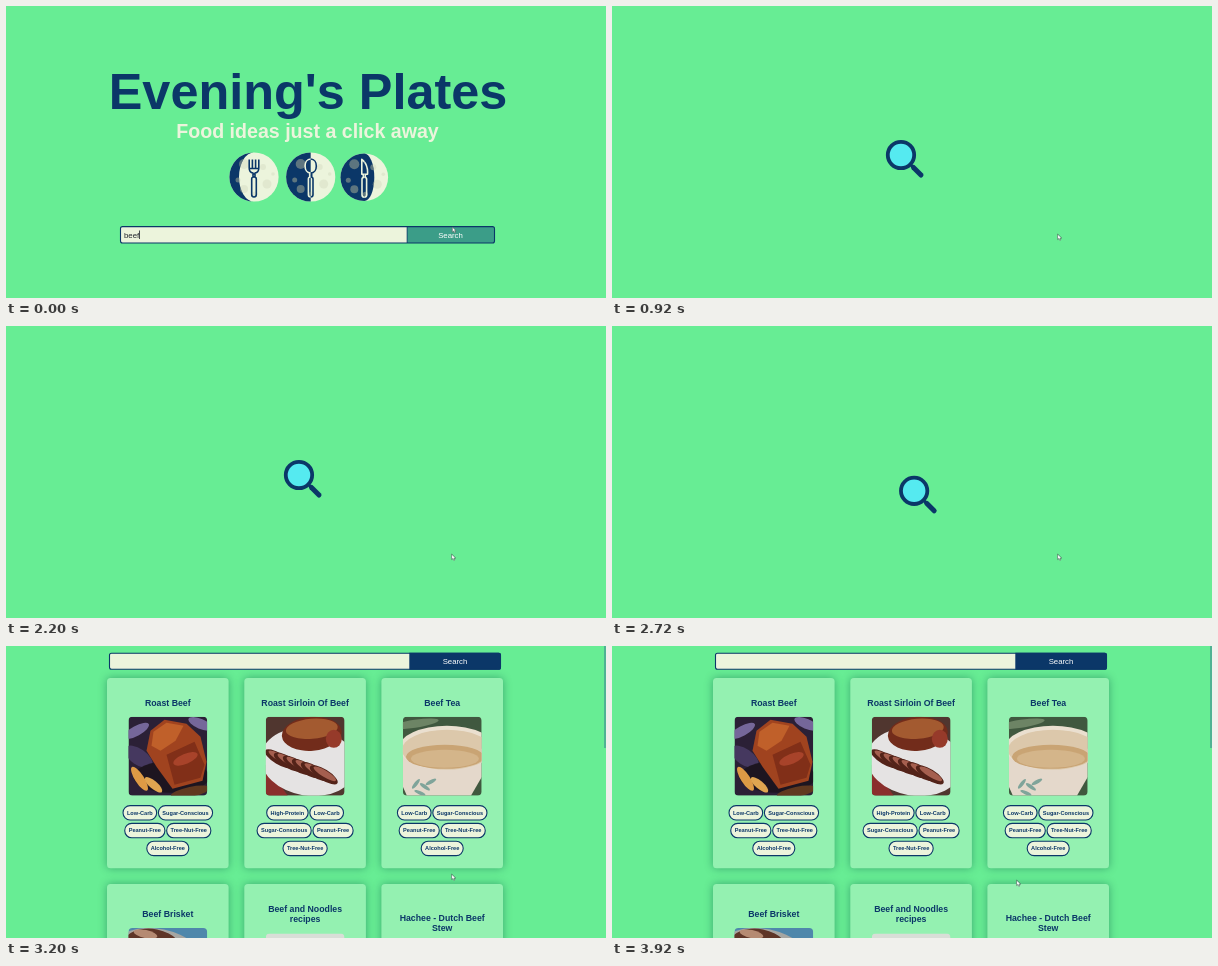
An HTML page with a canvas for the animation above (4 s loop, 600 px wide and 292 px high).

```html
<!DOCTYPE html>
<html lang="en">
<head>
<meta charset="utf-8">
<title>Recipe search</title>
<style>
html, body { margin: 0; width: 100%; height: 100%; overflow: hidden; background: #67ed94; }
canvas { display: block; width: 600px; height: 292px; }
</style>
</head>
<body>
<canvas id="stage"></canvas>
<script>
const canvas = document.getElementById('stage');
const ctx = canvas.getContext('2d');
const ratio = window.devicePixelRatio || 1;
canvas.width = 600 * ratio;
canvas.height = 292 * ratio;

const GREEN = '#67ed94', NAVY = '#0b3768', CREAM = '#ecf4dc', CARD = '#94f1b1';
const LOOP = 4000, LOADING = 833, RESULTS = 2800, PHOTOS = 3200;
const LENS_PERIOD = 1222;

const mix = (a, b, k) => a + (b - a) * k;
const clamp = k => Math.max(0, Math.min(1, k));
const smooth = k => k * k * (3 - 2 * k);

function text(str, x, y, size, color, bold = true, align = 'center') {
  ctx.font = `${bold ? 'bold ' : ''}${size}px "Liberation Sans", Arial, sans-serif`;
  ctx.textAlign = align;
  ctx.fillStyle = color;
  ctx.fillText(str, x, y);
}

function box(x, y, w, h, r, fill, stroke, line = 1) {
  ctx.beginPath();
  ctx.roundRect(x, y, w, h, r);
  if (fill) { ctx.fillStyle = fill; ctx.fill(); }
  if (stroke) { ctx.strokeStyle = stroke; ctx.lineWidth = line; ctx.stroke(); }
}

function oval(x, y, rx, ry, fill, turn = 0) {
  ctx.beginPath();
  ctx.ellipse(x, y, rx, ry, turn, 0, Math.PI * 2);
  ctx.fillStyle = fill;
  ctx.fill();
}

function shape(fill, ...points) {
  ctx.beginPath();
  points.forEach(([x, y]) => ctx.lineTo(x, y));
  ctx.closePath();
  ctx.fillStyle = fill;
  ctx.fill();
}

function backdrop(fill) {
  ctx.fillStyle = fill;
  ctx.fillRect(0, 0, 79, 79);
}

function scoped(draw) {
  ctx.save();
  draw();
  ctx.restore();
}

function pointer(x, y) {
  scoped(() => {
    ctx.translate(x, y);
    const outline = new Path2D('M0 0V5.2L1.3 4.1L2.2 6L3.2 5.5L2.3 3.7H3.8Z');
    ctx.fillStyle = '#fff';
    ctx.fill(outline);
    ctx.strokeStyle = '#4b5a58';
    ctx.lineWidth = 0.6;
    ctx.stroke(outline);
  });
}

// Icon paths are centred on the moon they sit on.
const HANDLE = 'M-1 0V-3H1V0M-2.3 2Q-2.3 0 0 0Q2.3 0 2.3 2V17.5Q2.3 20 0 20Q-2.3 20 -2.3 17.5Z';
const FORK = new Path2D('M-4.8 -17.5V-9Q-4.8 -4.5 -1 -4V0M1 0V-4Q4.8 -4.5 4.8 -9V-17.5M-1.6 -17.5V-9M1.6 -17.5V-9M-4.8 -8.5H4.8' + HANDLE);
const SPOON = new Path2D('M0 -18C7.5 -18 7.5 -4 0 -4C-7.5 -4 -7.5 -18 0 -18Z' + HANDLE);
const KNIFE = new Path2D('M-2.5 -18Q4 -13 3.2 -3H-2.5Z' + HANDLE);
const CRATERS = [[-10, -13, 5], [-16, 3, 2.5], [-10, 12, 4], [9, -10, 3], [13, 7, 4.5], [1, 17, 2.5], [19, -3, 1.8]];

function craters(fill) {
  CRATERS.forEach(([x, y, r]) => oval(x, y, r, r, fill));
}

function moon(x, y, r, edge, icon, leftInk, rightInk) {
  scoped(() => {
    ctx.translate(x, y);
    oval(0, 0, r, r, CREAM);
    craters('rgba(165,175,140,.16)');
    scoped(() => {
      ctx.beginPath();
      ctx.arc(0, 0, r, Math.PI / 2, Math.PI * 1.5);
      ctx.ellipse(0, 0, Math.abs(edge), r, 0, -Math.PI / 2, Math.PI / 2, edge < 0);
      ctx.fillStyle = NAVY;
      ctx.fill();
      ctx.clip();
      craters('rgba(175,180,150,.5)');
    });
    ctx.lineWidth = 1.6;
    ctx.lineJoin = 'round';
    [[-r, leftInk], [0, rightInk]].forEach(([left, ink]) => scoped(() => {
      ctx.beginPath();
      ctx.rect(left, -r, r, r * 2);
      ctx.clip();
      ctx.strokeStyle = ink;
      ctx.stroke(icon);
    }));
  });
}

function home() {
  text("Evening's Plates", 302, 102.5, 50.4, NAVY);
  text('Food ideas just a click away', 301.5, 132, 19.6, CREAM);
  moon(248, 171, 24.6, -15, FORK, NAVY, NAVY);
  moon(304.7, 171, 24.6, 0.01, SPOON, CREAM, NAVY);
  moon(358.3, 171.3, 23.8, 10, KNIFE, CREAM, CREAM);
  box(114.5, 220.6, 374, 16.4, 2, CREAM);
  box(401, 220.6, 87.5, 16.4, [0, 2, 2, 0], '#3b9d88');
  box(114.5, 220.6, 374, 16.4, 2, null, NAVY, 1.1);
  ctx.fillStyle = NAVY;
  ctx.fillRect(400.7, 221, 0.8, 16);
  text('beef', 118, 231.5, 7.8, '#20242c', false, 'left');
  ctx.fillRect(133, 224.5, 0.8, 8.5);
  text('Search', 444.5, 231.7, 7.8, '#fff', false);
}

// The lens travels round a triangle at an even pace along each side.
function lens(t) {
  const phase = ((t - LOADING) / LENS_PERIOD % 1) * 3;
  const corners = [[283, 149], [311, 149], [297, 174], [283, 149]];
  const side = Math.floor(phase);
  const [from, to] = [corners[side], corners[side + 1]];
  const x = mix(from[0], to[0], phase - side);
  const y = mix(from[1], to[1], phase - side);
  ctx.strokeStyle = NAVY;
  ctx.lineCap = 'round';
  ctx.lineWidth = 3;
  ctx.beginPath();
  ctx.moveTo(x + 9, y + 9);
  ctx.lineTo(x + 14, y + 14);
  ctx.stroke();
  ctx.lineWidth = 5;
  ctx.beginPath();
  ctx.moveTo(x + 12.5, y + 12.5);
  ctx.lineTo(x + 20, y + 20);
  ctx.stroke();
  oval(x, y, 13.2, 13.2, '#55eaf0');
  ctx.lineWidth = 3.8;
  ctx.stroke();
}

function roast() {
  backdrop('#2b2036');
  oval(8, 14, 14, 5, '#75679a', -0.5);
  oval(72, 7, 13, 5, '#75679a', 0.4);
  oval(10, 40, 16, 8, '#45385f', 0.6);
  oval(43, 60, 38, 16, '#1d1520');
  shape('#a0431f', [22, 14], [36, 3], [58, 7], [72, 20], [78, 45], [74, 64], [44, 72], [28, 50], [18, 34]);
  shape('#c0602a', [25, 15], [38, 6], [55, 9], [47, 24], [32, 34], [23, 29]);
  shape('#812f18', [38, 38], [66, 25], [76, 48], [72, 61], [46, 68]);
  oval(57, 42, 13, 5, '#a8432a', -0.4);
  oval(11, 62, 14, 4.5, '#dd9a45', 1);
  oval(25, 68, 11, 4, '#e0a550', 0.7);
  oval(62, 75, 20, 5, '#60391f', -0.2);
}

function sirloin() {
  backdrop('#50362f');
  shape('#8a2f2c', [0, 48], [22, 79], [0, 79]);
  oval(43, 45, 48, 34, '#e5e3e3', 0.15);
  oval(46, 17, 30, 17, '#722c1b', -0.08);
  oval(46, 12, 26, 10, '#a35a30', -0.08);
  oval(68, 22, 8, 9, '#963a2a');
  for (let i = 0; i < 6; i++) {
    const x = 13 + i * 9, y = 42 + i * 3.2;
    oval(x, y, 16, 5.5, '#532319', 0.55);
    oval(x + 1, y - 1, 13, 3.3, '#a55f4f', 0.55);
  }
}

function tea() {
  backdrop('#40583f');
  oval(12, 7, 24, 4, '#6d8465', -0.15);
  shape('#e4d8cb', [0, 32], [79, 32], [79, 60], [68, 79], [4, 79], [0, 70]);
  oval(44, 31, 48, 22, '#eadfcf');
  oval(44, 33, 45, 20, '#dcc8ab');
  oval(42, 40, 39, 12, '#c9a474');
  oval(42, 42, 34, 9, '#d4b58a');
  [[13, 67, -0.9], [22, 70, 0.6], [28, 65, -0.5], [17, 76, 0.4]].forEach(([x, y, turn]) => oval(x, y, 6, 1.8, '#7fa49a', turn));
}

function brisket() {
  backdrop('#4f87ab');
  oval(30, 28, 46, 27, '#a6a6a2', 0.2);
  oval(24, 24, 32, 23, '#5f3527', 0.2);
  oval(17, 6, 12, 4, '#b58a72', 0.2);
}

function noodles() {
  backdrop('#d9ded7');
}

function photo(x, y, draw) {
  scoped(() => {
    ctx.beginPath();
    ctx.roundRect(x - 39.3, y, 78.6, 78.6, 4);
    ctx.clip();
    ctx.translate(x - 39.3, y);
    draw();
  });
}

function tagRow(names, center, y) {
  ctx.font = 'bold 5.6px "Liberation Sans", Arial, sans-serif';
  const gap = 1.8;
  const widths = names.map(name => ctx.measureText(name).width + 7.8);
  let x = center - (widths.reduce((a, b) => a + b) + gap * (names.length - 1)) / 2;
  names.forEach((name, i) => {
    box(x, y - 7.2, widths[i], 14.4, 7, CREAM, NAVY, 1.1);
    text(name, x + widths[i] / 2, y + 1.8, 5.6, NAVY);
    x += widths[i] + gap;
  });
}

const COMMON = [['Low-Carb', 'Sugar-Conscious'], ['Peanut-Free', 'Tree-Nut-Free'], ['Alcohol-Free']];
const CARDS = [
  { x: 161.8, y: 32, title: ['Roast Beef'], base: 59.7, tags: COMMON, image: roast, top: 70.8 },
  { x: 299.1, y: 32, title: ['Roast Sirloin Of Beef'], base: 59.7, image: sirloin, top: 70.8,
    tags: [['High-Protein', 'Low-Carb'], ['Sugar-Conscious', 'Peanut-Free'], ['Tree-Nut-Free']] },
  { x: 436.2, y: 32, title: ['Beef Tea'], base: 59.7, tags: COMMON, image: tea, top: 70.8 },
  { x: 161.8, y: 238, title: ['Beef Brisket'], base: 271.2, image: brisket, top: 282 },
  { x: 299.1, y: 238, title: ['Beef and Noodles', 'recipes'], base: 266.2, image: noodles, top: 287.5 },
  { x: 436.2, y: 238, title: ['Hachee - Dutch Beef', 'Stew'], base: 275, image: null }
];

function card({ x, y, title, base, tags = [], image, top }, showPhoto) {
  scoped(() => {
    ctx.shadowColor = 'rgba(0,75,65,.42)';
    ctx.shadowBlur = 8 * ratio;
    box(x - 60.8, y, 121.6, 190.3, 3.5, CARD);
  });
  title.forEach((line, i) => text(line, x, base + i * 10, 8.75, NAVY));
  tags.forEach((row, i) => tagRow(row, x, 166.8 + i * 17.8));
  if (showPhoto && image) photo(x, top, image);
}

function results(t) {
  box(103.5, 7.3, 391, 16, 2, CREAM, NAVY, 1.1);
  box(403.3, 6.8, 91.7, 17, [0, 2, 2, 0], NAVY);
  text('Search', 449, 18, 7.8, '#fff', false);
  CARDS.forEach(item => card(item, t >= PHOTOS));
  box(598, 0, 2, 102, 0, '#4fb393');
}

function pointerAt(t) {
  const settle = smooth(clamp(t / 400));
  const leave = smooth(clamp((t - 3400) / 520));
  return [mix(446.3, 445.6, settle) - 41 * leave, mix(221, 228.4, settle) + 6 * leave];
}

// The picture holds for 120 ms and 80 ms in turn.
const held = t => t - t % 200 + (t % 200 >= 120 ? 120 : 0);

function render(now) {
  const t = held(now % LOOP);
  ctx.setTransform(ratio, 0, 0, ratio, 0, 0);
  ctx.fillStyle = GREEN;
  ctx.fillRect(0, 0, 600, 292);
  if (t < LOADING) home();
  else if (t < RESULTS) lens(t);
  else results(t);
  pointer(...pointerAt(t));
}

let start;
function tick(now) {
  start ??= now;
  render(Math.max(0, now - start));
  requestAnimationFrame(tick);
}
render(0);
requestAnimationFrame(tick);
</script>
</body>
</html>
```
